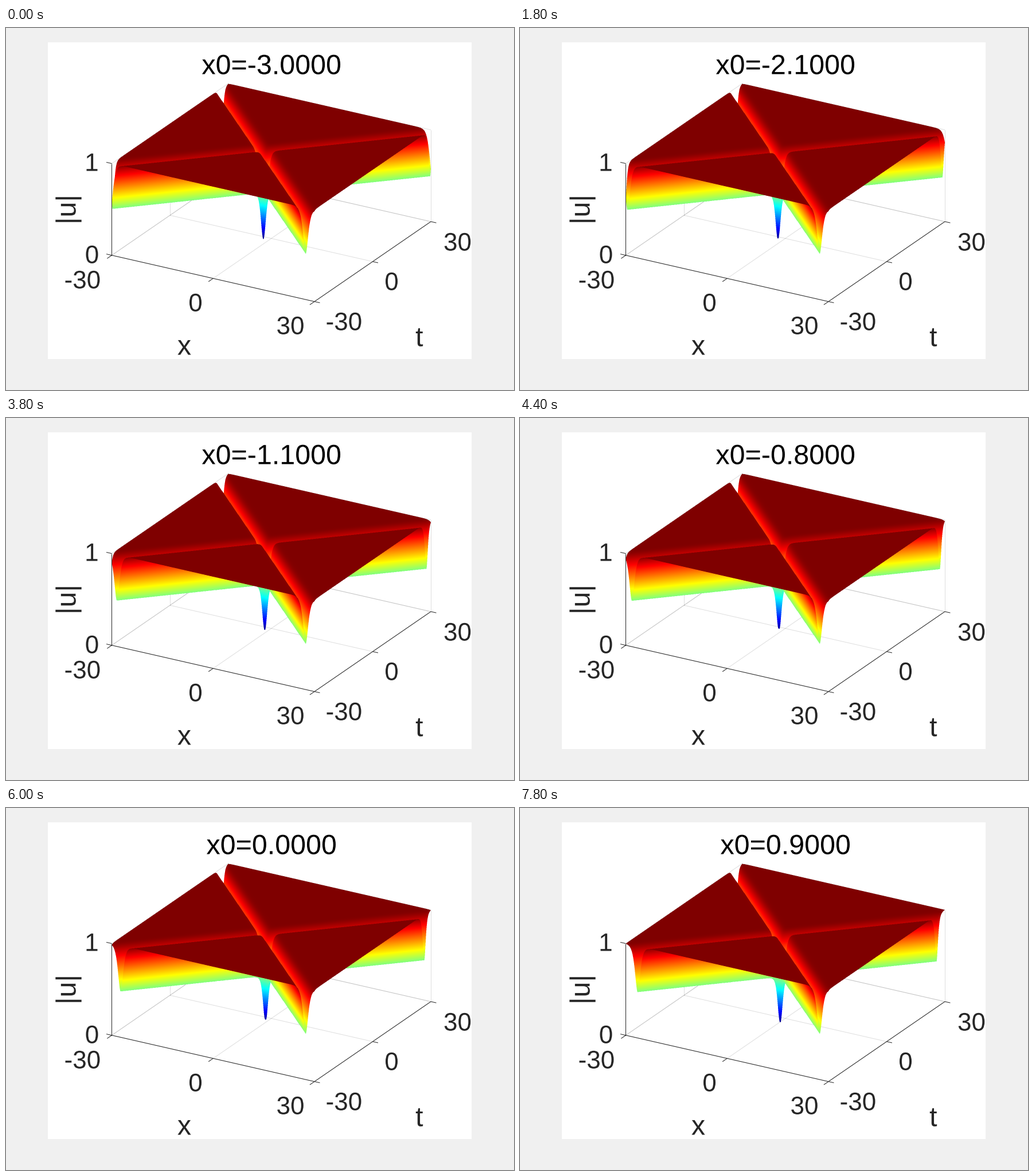
A matplotlib script that plays this animation: 886x632 px, repeating every 8000 ms.

```python
import numpy as np
import matplotlib.pyplot as plt
from matplotlib.animation import FuncAnimation
from matplotlib.patches import PathPatch
from matplotlib.path import Path
from matplotlib.textpath import TextPath

W, H, DPI = 886, 632, 100
FRAMES, STEP_MS = 40, 200
INK = (0.15, 0.15, 0.15)
TICK, LABEL = 44.0, 48.4

# Oblique view: screen position of (-30, -30, 0) and the three edge vectors
CX, CY = 184.5, 396.8
XDX, XDY = 353.5, 80.8
TDX, TDY = 203.0, -139.6
ZDY = -160.2

# Pixel window that holds the surface, and its supersampling
L, R, TOP, BOT = 184, 742, 90, 412
SX, SY = 3, 2
DEPTH = 900
K = np.sqrt(3)


def project(x, t, z=0.0):
    a, b = (x + 30) / 60, (t + 30) / 60
    return CX + XDX * a + TDX * b, CY + XDY * a + TDY * b + ZDY * z


def jet(v):
    return np.stack([np.clip(1.5 - np.abs(4 * v - c), 0, 1) for c in (3, 2, 1)], axis=-1)


# Each screen column looks along one line of the (x, t) plane, front to back
cols = L + (np.arange((R - L) * SX) + 0.5) / SX
rows = TOP + (np.arange((BOT - TOP) * SY) + 0.5) / SY
inside = np.flatnonzero((cols > CX) & (cols < CX + XDX + TDX))
p = (cols[inside] - CX)[:, None]
near = np.minimum(1, p / XDX)
far = np.maximum(0, (p - TDX) / XDX)
A = near + (far - near) * np.linspace(0, 1, DEPTH)
B = (p - XDX * A) / TDX
FLOOR = CY + XDY * A + TDY * B

# Exponentials of the two waves; only the first one depends on x0
RIGHT = 2 * np.exp(K * (60 * (A - B) - 3))
LEFT = 2 * np.exp(K * (60 * (A + B) - 57))


def amplitude(x0):
    """|u| of two dark solitons moving at speeds +1 and -1."""
    e1 = RIGHT * np.exp(-K * x0)
    both = e1 * LEFT / 4
    total = e1 + LEFT
    real = 1 - total / 2 + both
    imag = K / 2 * (e1 - LEFT)
    return np.hypot(real, imag) / (1 + total + both)


def render(x0):
    z = amplitude(x0)
    y = FLOOR + ZDY * z
    # Floating horizons: the nearest part of the sheet wins in every column
    upper = np.minimum.accumulate(y, axis=1)[:, ::-1]
    lower = np.maximum.accumulate(y, axis=1)
    ys = np.concatenate([upper, lower], axis=1)
    zs = np.concatenate([z[:, ::-1], z], axis=1)
    height = np.full((len(cols), len(rows)), np.nan)
    for i, yy, zz in zip(inside, ys, zs):
        height[i] = np.interp(rows, yy, zz, left=np.nan, right=np.nan)
    height = height.T
    seen = ~np.isnan(height)
    rgba = np.dstack([jet(np.where(seen, height, 0)) * seen[..., None], seen])
    rgba = rgba.reshape(BOT - TOP, SY, R - L, SX, 4).mean(axis=(1, 3))
    rgba[..., :3] /= np.maximum(rgba[..., 3:], 1e-6)
    return np.clip(rgba, 0, 1)


def glyphs(text, size, x, base):
    """Outline of the text with its ink centred on x and its baseline at base."""
    tp = TextPath((0, 0), text, size=size, prop={"family": "Liberation Sans"})
    box = tp.get_extents()
    return Path(tp.vertices * [1, -1] + [x - (box.x0 + box.x1) / 2, base], tp.codes)


def turned(text, size, x, y):
    """Outline of the text reading upwards, its ink centred on (x, y)."""
    tp = TextPath((0, 0), text, size=size, prop={"family": "Liberation Sans"})
    box = tp.get_extents()
    mid = [(box.x0 + box.x1) / 2, (box.y0 + box.y1) / 2]
    return Path([x, y] - (tp.vertices - mid)[:, ::-1], tp.codes)


fig = plt.figure(figsize=(W / DPI, H / DPI), dpi=DPI, facecolor="#f0f0f0")
ax = fig.add_axes([0, 0, 1, 1])
ax.axis("off")


def line(p0, p1, **style):
    style = dict(color=INK, lw=0.72, solid_capstyle="butt", zorder=4) | style
    ax.plot([p0[0], p1[0]], [p0[1], p1[1]], **style)


def ink(path, color=INK):
    return ax.add_patch(PathPatch(path, fc=color, ec="none", lw=0, zorder=5))


ax.add_patch(plt.Rectangle((73, 25), 739, 553, fc="white", ec="none", zorder=0))

# Grid on the floor and the two back walls
grid = dict(alpha=0.15, zorder=1)
for v in (-30, 0, 30):
    line(project(v, -30), project(v, 30), **grid)
    line(project(-30, v), project(30, v), **grid)
    line(project(v, 30), project(v, 30, 1), **grid)
    line(project(-30, v), project(-30, v, 1), **grid)
for z in (0, 1):
    line(project(-30, -30, z), project(-30, 30, z), **grid)
    line(project(-30, 30, z), project(30, 30, z), **grid)

# Axis lines and ticks
line(project(-30, -30), project(-30, -30, 1))
line(project(-30, -30), project(30, -30))
line(project(30, -30), project(30, 30))
for v in (-30, 0, 30):
    line(project(v, -30), project(v, -32.4))
    line(project(30, v), project(31.6, v))
for z in (0, 1):
    line(project(-30, -30, z), project(-31.6, -30, z))

for x, base, text in [(150, 249.5, "1"), (150, 410.5, "0"),
                      (133.5, 454.5, "-30"), (330.5, 494.5, "0"), (496, 534.5, "30"),
                      (589.5, 527.5, "-30"), (672.5, 457.5, "0"), (787.5, 388.5, "30")]:
    ink(glyphs(text, TICK, x, base))
ink(glyphs("x", LABEL, 311, 570.5))
ink(glyphs("t", LABEL, 721, 555.5))
ink(turned("|u|", LABEL, 109, 317))
title = ink(glyphs("x0=", LABEL, 462.5, 80.5), "black")

sheet = ax.imshow(np.zeros((BOT - TOP, R - L, 4)), extent=(L, R, BOT, TOP),
                  interpolation="nearest", aspect="auto", zorder=3)
ax.set_xlim(0, W)
ax.set_ylim(H, 0)


def draw(n):
    x0 = (n - 30) / 10
    title.set_path(glyphs(f"x0={x0:.4f}", LABEL, 462.5, 80.5))
    sheet.set_data(render(x0))
    return sheet, title


anim = FuncAnimation(fig, draw, frames=FRAMES, interval=STEP_MS, repeat=True, repeat_delay=0)
plt.show()
```
